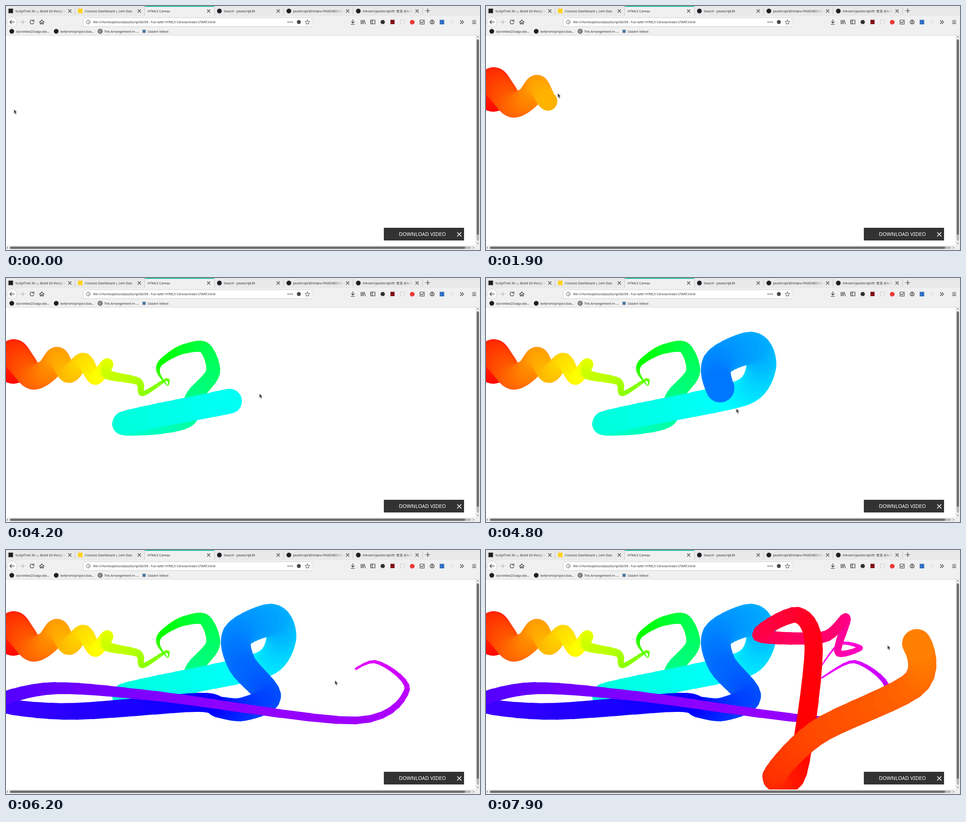
An HTML page that plays this animation: 1040 by 538 pixels, repeating every 8000 ms.

```html
<!DOCTYPE html>
<html lang="en">
<head>
<meta charset="utf-8">
<title>HTML5 Canvas</title>
<style>
  html, body { margin: 0; width: 100%; height: 100%; overflow: hidden; background: #fff; }
  svg { display: block; width: 100%; height: 100%; }
  text { font: 7.2px "Noto Sans", "Noto Sans CJK SC", "Noto Sans CJK", sans-serif; fill: #2e2e2e; }
  .icon { fill: none; stroke: #333; stroke-width: 1.2; stroke-linecap: round; stroke-linejoin: round; }
  .thin { stroke-width: .9; }
</style>
</head>
<body>
<svg viewBox="0 0 1040 538" xmlns="http://www.w3.org/2000/svg">
  <defs>
    <clipPath id="page"><rect y="65" width="1030" height="463"/></clipPath>
    <linearGradient id="fade">
      <stop offset="0" stop-color="#e9e9e9" stop-opacity="0"/>
      <stop offset="1" stop-color="#e9e9e9"/>
    </linearGradient>
  </defs>
  <rect width="1040" height="538" fill="#fff"/>
  <g clip-path="url(#page)">
    <g id="paint" stroke-linecap="round"></g>
    <rect x="829" y="489" width="176" height="28" fill="#323232"/>
    <text x="862" y="507" style="font-size:11.35px;fill:#fff">DOWNLOAD VIDEO</text>
    <path d="M990 499l9 9m0-9l-9 9" stroke="#fff" stroke-width="1.6"/>
    <path id="cursor" d="M0 0V9L2 7.3L3.6 11L5.2 10.3L3.8 6.8L6.4 6.3Z" fill="#444" stroke="#ddd" stroke-width=".3"/>
  </g>

  <!-- browser bars -->
  <rect width="1040" height="22" fill="#e9e9e9"/>
  <rect y="22" width="1040" height="43" fill="#f0f0f0"/>
  <rect x="305" width="152" height="22" fill="#f0f0f0"/>
  <rect x="305" width="152" height="1.8" fill="#1abc9c"/>
  <path d="M0 64.6H1040" stroke="#ccc" stroke-width=".8"/>
  <g id="tabs"></g>
  <path class="icon" d="M921 10.5h9m-4.5-4.5v9"/>

  <circle cx="13" cy="35.3" r="11.5" fill="#fafafa" stroke="#bbb" stroke-width=".8"/>
  <g class="icon">
    <path d="M18 35.3H8.5m4-4.2l-4.2 4.2l4.2 4.2"/>
    <path d="M30.5 35.3h9.5m-4-4.2l4.2 4.2l-4.2 4.2" stroke="#b5b5b5"/>
    <path d="M60.5 32.5a4.4 4.4 0 1 0 .7 4.2m0-6.2v3h-3"/>
    <path d="M73.5 35.5l5-4.7l5 4.7m-8.5-.8v5h2.3v-3h2.4v3h2.3v-5"/>
  </g>
  <rect x="169.4" y="26" width="501.5" height="19" rx="1.5" fill="#fff" stroke="#c6c6c6" stroke-width=".8"/>
  <g class="icon thin" stroke="#666">
    <circle cx="180.5" cy="35.4" r="4.3"/>
    <path d="M180.5 35v2.6m0-4.5v.1"/>
  </g>
  <text x="191" y="38.2">file:///home/pelund/JavaScript30/08 - Fun with HTML5 Canvas/index-START.html</text>
  <path d="M619 35.4h.1m4.2 0h.1m4.2 0h.1" stroke="#444" stroke-width="2.4" stroke-linecap="round"/>
  <circle cx="642.5" cy="35.4" r="4.3" fill="#444"/>
  <path class="icon thin" d="M661.5 30.3l1.5 3.4l3.7 .4l-2.8 2.5l.8 3.7l-3.2-1.9l-3.2 1.9l.8-3.7l-2.8-2.5l3.7-.4z"/>

  <g class="icon">
    <path d="M761 30v7.5m-3.3-3l3.3 3.2l3.3-3.2M757 40.5h8"/>
    <path d="M779 31v8.5m2.7-8.5v8.5m2.6-8.5v8.5m1.8-8.2l2.3 8"/>
    <path d="M800 31h9.5v8.5h-9.5zm4 0v8.5m-2.5-6h.2m-.2 2.5h.2"/>
    <path d="M865.5 30.5h8.5v9h-8.5z" stroke="#c8c8c8" stroke-dasharray="2 1.5"/>
    <path d="M908.5 31h9v9h-9zm2 4.7l1.9 1.9l3.3-4"/>
    <circle cx="935" cy="35.4" r="4.5"/>
    <circle cx="935" cy="34" r="1.2"/>
    <path d="M932.5 38.2q2.5-2.2 5 0"/>
    <path d="M974 35.4h.2m2.5-3h.2m2.5 3h.2m-2.8 3h.2m2.5-6h.2" stroke="#aaa"/>
    <path d="M996.5 31.8l3.5 3.6l-3.5 3.6m4-7.2l3.5 3.6l-3.5 3.6"/>
    <path d="M1023.5 32h7.5m-7.5 3.3h7.5m-7.5 3.3h7.5"/>
  </g>
  <circle cx="826.5" cy="35.4" r="4.7" fill="#333"/>
  <rect x="843.5" y="30.5" width="9" height="9.5" fill="#800b16"/>
  <circle cx="891.3" cy="35.6" r="5.2" fill="#f03a37"/>
  <rect x="951.5" y="30.5" width="10" height="10" fill="#2f70c0"/>

  <g id="bookmarks"></g>
  <g class="icon thin">
    <circle cx="206.6" cy="55.8" r="5"/>
    <ellipse cx="206.6" cy="55.8" rx="2.3" ry="5"/>
    <path d="M201.6 55.8h10m-9.2-2.5h8.4m-8.4 5h8.4"/>
  </g>
  <rect x="299.5" y="52.3" width="7" height="7" rx=".7" fill="#4e79a5"/>

  <!-- scroll bars -->
  <path d="M1030 65h10v473H0v-10h1030z" fill="#ededed"/>
  <g fill="none" stroke-width="5" stroke-linecap="round">
    <path d="M1035.3 76V515M11 533H1018" stroke="#b8b8b8"/>
    <path d="M1035.3 76V502M11 533H1005" stroke="#6d6d6d"/>
  </g>
  <path class="icon thin" d="M1033.5 69l1.8-1.7l1.8 1.7m-3.6 453.5l1.8 1.7l1.8-1.7M4 531.2l-1.7 1.8l1.7 1.8M1025 531.2l1.7 1.8l-1.7 1.8"/>
</svg>

<script>
const NS = "http://www.w3.org/2000/svg";
const LOOP = 8000;
const LAST_HUE = 390;
const HUE_PER_POINT = 7.1;
const byId = id => document.getElementById(id);

function add(parent, tag, attrs, content = "") {
  const node = document.createElementNS(NS, tag);
  for (const key in attrs) node.setAttribute(key, attrs[key]);
  node.textContent = content;
  return parent.appendChild(node);
}

// Where the mouse is at equal steps of time, joined by a smooth curve.
const route = `M16 198 17 168 36 190 60 218 92 203 113 175 138 211 170 183 196 220 222 190
  223 213 290 228 300 255 352 224 354 237 335 210 337 190 360 171 392 156 436 154
  454 208 412 262 398 308 330 322 263 318 502 269 580 243 604 192 582 154 508 188
  518 252 575 322 520 351 470 347 416 336 140 356 -18 338 100 305 330 322 765 376
  880 308 808 246 722 288 772 209 822 216 772 226 790 150 740 192 600 188 683 143
  719 220 682 490 632 498 730 400 940 295 943 203 881 210`
  .match(/-?\d+ -?\d+/g).map(pair => pair.split(" ").map(Number));

// Cardinal spline through the route; u counts points.
function pointAt(u) {
  const last = route.length - 1;
  const i = Math.min(last - 1, Math.floor(u));
  const s = Math.min(1, u - i), s2 = s * s, s3 = s2 * s;
  const [a, b, c, d] = [-1, 0, 1, 2].map(k => route[Math.max(0, Math.min(last, i + k))]);
  const tension = 0.45;
  return [0, 1].map(k =>
    b[k] * (2 * s3 - 3 * s2 + 1) + c[k] * (3 * s2 - 2 * s3) +
    tension * ((c[k] - a[k]) * (s3 - 2 * s2 + s) + (d[k] - b[k]) * (s3 - s2)));
}

// The brush thins and thickens by turns, once per 200 degrees of hue.
const brushWidth = hue => 1 + 0.7 * Math.abs(100 - hue % 200);

// The hand starts slowly, then keeps a steady pace.
const routeProgress = t => Math.max(0, (t - 900) / 167, 6 + (t - 1900) / 121.4);

// Each mouse event paints one round segment, one degree of hue further.
const segments = [];
for (let hue = 1; hue <= LAST_HUE; hue++) {
  const [x1, y1] = pointAt((hue - 1) / HUE_PER_POINT);
  const [x2, y2] = pointAt(hue / HUE_PER_POINT);
  segments.push(add(byId("paint"), "line", {
    x1, y1, x2, y2,
    stroke: `hsl(${hue % 360},100%,50%)`,
    "stroke-width": brushWidth(hue)
  }));
}

const tabs = [
  ["ScriptTrail 30 — Build 30 things wi", "#202020"],
  ["Courses Dashboard | Lem Dax", "#ffd21c"],
  ["HTML5 Canvas"],
  ["Search · javascript30", "#1b1f23"],
  ["JavaScript30/index-FINISHED.html", "#1b1f23"],
  ["mirolen/JavaScript30: 有关 @lenka", "#1b1f23"]
];
tabs.forEach(([title, color], i) => {
  const x = i * 152.4, group = byId("tabs");
  if (color && i < 2) add(group, "rect", { x: x + 5.5, y: 5.8, width: 10, height: 10, fill: color });
  else if (color) add(group, "circle", { cx: x + 11, cy: 11, r: 5.2, fill: color });
  add(group, "text", { x: x + (color ? 20.5 : 5.7), y: 13.7 }, title);
  if (title.length > 28) {
    add(group, "rect", { x: x + 112, y: 3, width: 20, height: 16, fill: "url(#fade)" });
    add(group, "rect", { x: x + 132, y: 3, width: 19, height: 16, fill: "#e9e9e9" });
  }
  add(group, "path", { class: "icon", d: `M${x + 137} 8l6 6m0-6l-6 6` });
  const inset = i === 1 || i === 2 ? 0 : 3;
  add(group, "path", { d: `M${x + 152} ${inset}V${22 - inset}`, stroke: "#bdbdbd", "stroke-width": 0.8 });
});

const bookmarks = [[22, "dorvinkel23/app-ide..."], [119.5, "kelbrom/project-bas..."],
  [215.5, "The Arrangement in ..."], [311, "Osbert Vellon"]];
bookmarks.forEach(([x, title], i) => {
  add(byId("bookmarks"), "text", { x, y: 58.6 }, title);
  if (i < 2) add(byId("bookmarks"), "circle", { cx: x - 9.3, cy: 55.8, r: 5.2, fill: "#1b1f23" });
});

function render(time) {
  const t = Math.floor(time / 100) * 100;
  const u = routeProgress(t);
  segments.forEach((line, i) =>
    line.setAttribute("display", i + 1 <= u * HUE_PER_POINT ? "inline" : "none"));
  // The pointer runs a little ahead of the paint.
  const [x, y] = t < 200 ? [17.5, 228] : pointAt(u && u + 0.6);
  byId("cursor").setAttribute("transform", `translate(${x} ${y})`);
}

const start = performance.now();
function tick() {
  render((performance.now() - start) % LOOP);
  requestAnimationFrame(tick);
}
tick();
</script>
</body>
</html>
```
